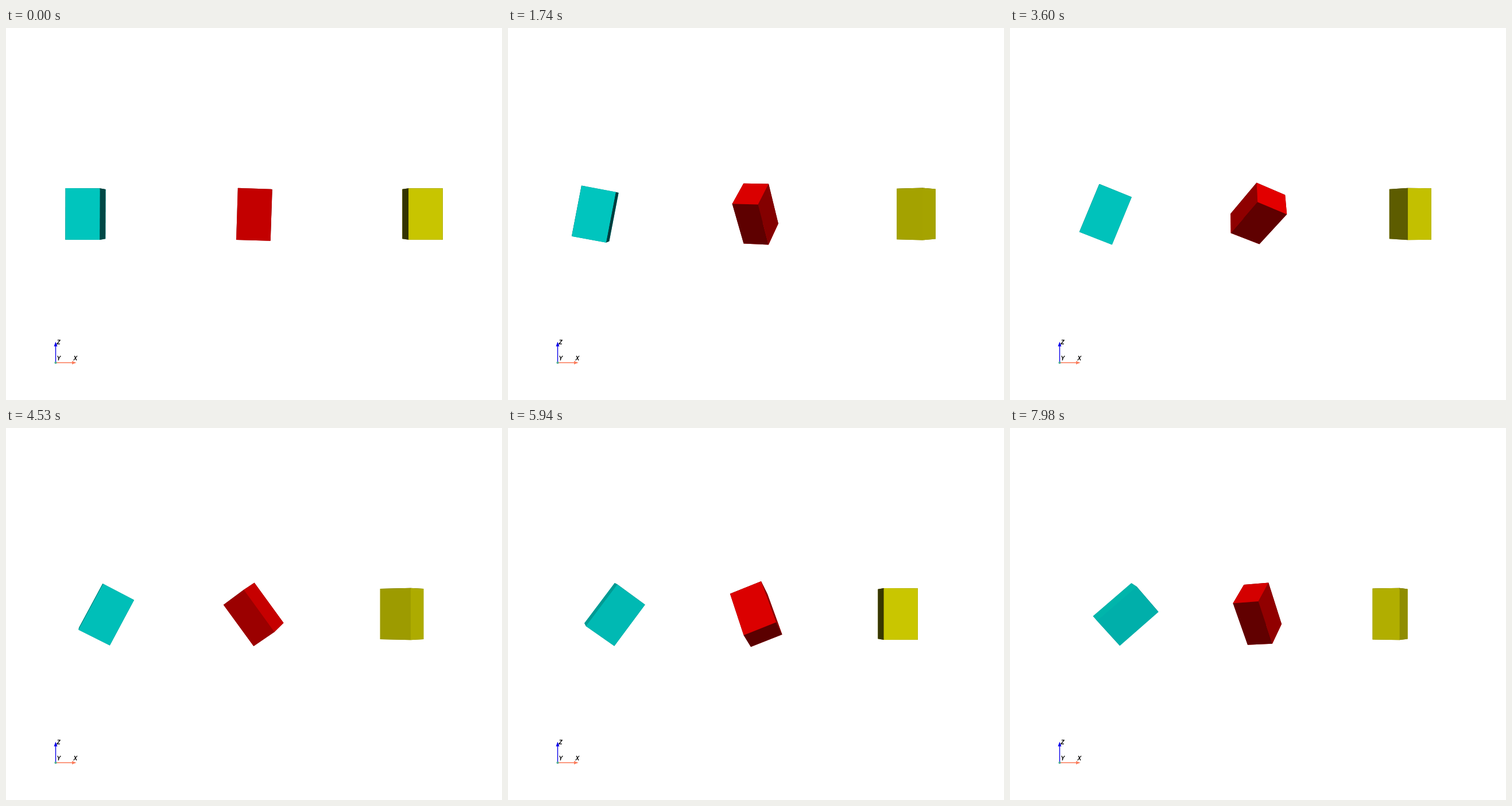
An HTML page with a canvas for the animation above (8000 ms loop, 864 px wide and 648 px high).

```html
<!DOCTYPE html>
<html lang="en">
<head>
<meta charset="utf-8">
<title>Spinning boxes</title>
<style>
  html, body { margin: 0; width: 100%; height: 100%; overflow: hidden; background: #fff; }
  canvas { display: block; }
</style>
</head>
<body>
<canvas id="stage" width="864" height="648"></canvas>
<script>
const ctx = document.getElementById('stage').getContext('2d');
const LOOP = 8000, FRAME = 30, STEP = 0.016;
const CENTER = [432, 324], DISTANCE = 41.25;
const FOCAL = 324 / Math.tan(Math.PI / 12);
const HALF = [1, 0.8, 1.5];

// World axes: x right, y away from the viewer, z up.
const boxes = [
  { color: [0, 1, 1], x: -10, speed: 0.5, spin: [0, 0.2, 0.1] },
  { color: [1, 0, 0], x: 0, speed: 0, spin: [3, 2, 1] },
  { color: [1, 1, 0], x: 10, speed: -0.5, spin: [0, 0, 1] },
];

// Key, fill, head and two back lights, fixed to the camera.
const WHITE = [1, 1, 1];
const lights = [
  light(50, 10, 0.75, [1, 0.972, 0.902]),
  light(-75, 0, 0.25, [0.908, 0.933, 1]),
  light(0, 0, 0.25, WHITE),
  light(0, 110, 0.75 / 3.5, WHITE),
  light(0, -110, 0.75 / 3.5, WHITE),
];

function light(elevation, azimuth, power, tint) {
  const e = elevation * Math.PI / 180, a = azimuth * Math.PI / 180;
  return {
    dir: [Math.cos(e) * Math.sin(a), -Math.cos(e) * Math.cos(a), Math.sin(e)],
    power, tint,
  };
}

const dot = (a, b) => a[0] * b[0] + a[1] * b[1] + a[2] * b[2];
const scale = (a, k) => a.map(v => v * k);
const add = (...vs) => [0, 1, 2].map(i => vs.reduce((sum, v) => sum + v[i], 0));
const cross = (a, b) => [
  a[1] * b[2] - a[2] * b[1],
  a[2] * b[0] - a[0] * b[2],
  a[0] * b[1] - a[1] * b[0],
];

function rotate(v, axis, angle) {
  const c = Math.cos(angle);
  return add(scale(v, c), scale(cross(axis, v), Math.sin(angle)),
    scale(axis, dot(axis, v) * (1 - c)));
}

function project([x, y, z]) {
  const k = FOCAL / (DISTANCE + y);
  return [CENTER[0] + x * k, CENTER[1] - z * k];
}

function shade(normal, color) {
  const rgb = color.map((c, i) => c * lights.reduce((sum, l) =>
    sum + Math.max(0, dot(normal, l.dir)) * l.power * l.tint[i], 0));
  return `rgb(${rgb.map(v => Math.round(255 * Math.min(1, v)))})`;
}

function polygon(points, fill) {
  ctx.beginPath();
  points.forEach(p => ctx.lineTo(...p));
  ctx.closePath();
  ctx.fillStyle = fill;
  ctx.fill();
}

function drawBox({ color, x, speed, spin }, time) {
  const center = [x + speed * time, 0, 0];
  const rate = Math.hypot(...spin), axis = scale(spin, 1 / rate);
  const axes = [[1, 0, 0], [0, 1, 0], [0, 0, 1]].map(v => rotate(v, axis, rate * time));
  const faces = [];
  for (let i = 0; i < 3; i++) {
    const u = scale(axes[(i + 1) % 3], HALF[(i + 1) % 3]);
    const v = scale(axes[(i + 2) % 3], HALF[(i + 2) % 3]);
    for (const side of [-1, 1]) {
      const normal = scale(axes[i], side);
      const middle = add(center, scale(normal, HALF[i]));
      const corners = [[-1, -1], [1, -1], [1, 1], [-1, 1]]
        .map(([p, q]) => project(add(middle, scale(u, p), scale(v, q))));
      const front = dot(normal, add(middle, [0, DISTANCE, 0])) < 0;
      faces.push({ corners, front, normal: front ? normal : scale(normal, -1) });
    }
  }
  // Rear faces go first so that no background shows through the seams.
  faces.sort((a, b) => a.front - b.front);
  faces.forEach(f => polygon(f.corners, shade(f.normal, color)));
}

function drawAxes() {
  const red = '#fb7f5f', blue = '#0a00ea';
  polygon([[86, 582.2], [116, 582.2], [116, 583.8], [86, 583.8]], red);
  polygon([[115, 580], [122.5, 583], [115, 586]], red);
  polygon([[85.8, 553], [87.2, 553], [87.2, 583], [85.8, 583]], blue);
  polygon([[83.5, 554.5], [86.5, 546.5], [89.5, 554.5]], blue);
  ctx.beginPath();
  ctx.arc(86.5, 583, 2.1, 0, 2 * Math.PI);
  ctx.fillStyle = '#4fae92';
  ctx.fill();
  ctx.fillStyle = '#000';
  ctx.font = 'italic bold 10px "Liberation Sans", Arial, sans-serif';
  ctx.fillText('Z', 88.5, 550.5);
  ctx.fillText('Y', 88.5, 579.3);
  ctx.fillText('X', 117.5, 579.3);
}

function draw() {
  const time = STEP * (Math.floor(performance.now() % LOOP / FRAME) + 1);
  ctx.fillStyle = '#fff';
  ctx.fillRect(0, 0, 864, 648);
  boxes.forEach(box => drawBox(box, time));
  drawAxes();
  requestAnimationFrame(draw);
}
draw();
</script>
</body>
</html>
```
